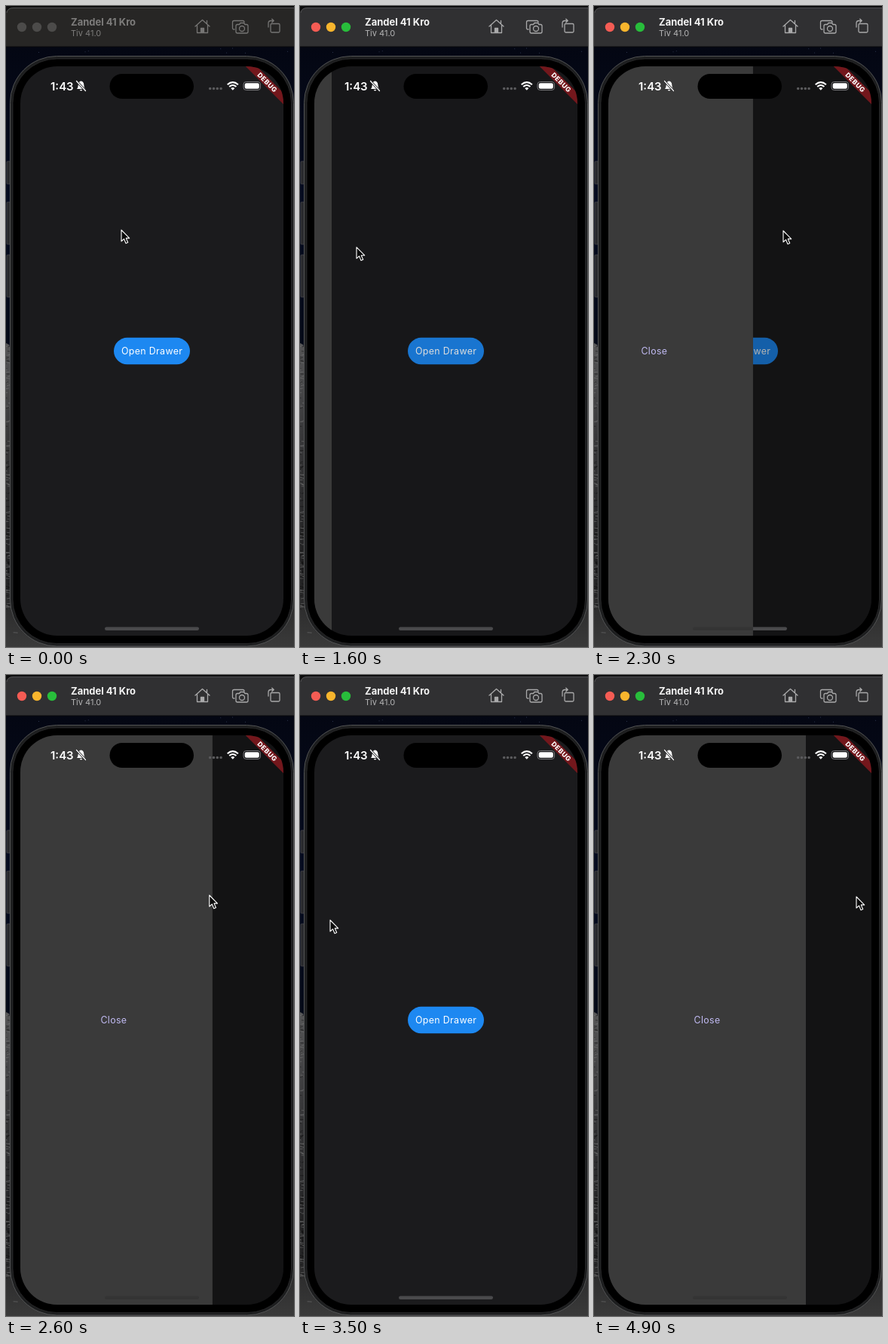
These frames come from a looping animation (382x850 px, 5000 ms). An HTML page:

```html
<!DOCTYPE html>
<html lang="en">
<head>
<meta charset="utf-8">
<title>Drawer demo</title>
<style>
  html, body { margin: 0; width: 100%; height: 100%; overflow: hidden; background: #050816; }
  svg { display: block; width: 382px; height: 850px; font-family: Inter, Roboto, sans-serif; }
  .label { font-size: 12.4px; letter-spacing: .35px; text-anchor: middle; }
  #bar { --bg: #303032; --title: #f4f4f4; --sub: #b4b4b5; --icon: #a9a9aa; --red: #f45c54; --amber: #f8b52d; --green: #28bd3b; }
  #bar.idle { --bg: #272625; --title: #7d7c7b; --sub: #7d7c7b; --icon: #767574; --red: #4c4b4a; --amber: #4c4b4a; --green: #4c4b4a; }
  #icons { fill: none; stroke: var(--icon); stroke-width: 1.3; stroke-linejoin: round; stroke-linecap: round; }
</style>
</head>
<body>
<svg viewBox="0 0 382 850">
  <defs>
    <linearGradient id="sky" x2="0" y2="1">
      <stop offset="0" stop-color="#03050f"/>
      <stop offset=".3" stop-color="#060c20"/>
      <stop offset=".52" stop-color="#050a18"/>
    </linearGradient>
    <linearGradient id="rock" x2="0" y2="1">
      <stop offset="0" stop-color="#555556"/>
      <stop offset=".3" stop-color="#38383a"/>
      <stop offset=".75" stop-color="#202021"/>
      <stop offset="1" stop-color="#3a3a3a"/>
    </linearGradient>
    <clipPath id="screen"><rect x="19" y="80" width="349" height="755" rx="49"/></clipPath>
  </defs>

  <rect width="382" height="850" fill="url(#sky)"/>
  <path d="M0 447L4 449L8 462H382V850H0Z" fill="url(#rock)"/>
  <g id="specks"></g>

  <g id="bar">
    <rect width="382" height="12" fill="#0c0c0d"/>
    <path d="M0 54V10Q1 2 10 2H382V54Z" fill="var(--bg)"/>
    <path d="M1 9Q2 2.5 10 2.5H382" fill="none" stroke="#505052"/>
    <path d="M0 54H382" stroke="#09090b"/>
    <circle cx="21" cy="28" r="6.2" fill="var(--red)"/>
    <circle cx="41" cy="28" r="6.2" fill="var(--amber)"/>
    <circle cx="61" cy="28" r="6.2" fill="var(--green)"/>
    <text x="86" y="26" font-size="13" font-weight="700" fill="var(--title)">Zandel 41 Kro</text>
    <text x="86" y="40" font-size="11" fill="var(--sub)">Tiv 41.0</text>
    <g id="icons">
      <path d="M251 27L260.5 18.5L270 27M253.5 25.5V35.5H267.5V25.5M266.5 23V19.5"/>
      <path d="M258.5 35V29.5H262.5V35" fill="var(--icon)"/>
      <path d="M303 31H302Q300.5 31 300.5 29.5V21.5Q300.5 19.5 302.5 19.5H314Q316 19.5 316 21.5"/>
      <path d="M307 24.5H309.5L311 22.5H315.5L317 24.5H319Q321 24.5 321 26.5V34Q321 36 319 36H307Q305 36 305 34V26.5Q305 24.5 307 24.5Z"/>
      <circle cx="313" cy="30" r="3.5"/>
      <rect x="351" y="23.5" width="12" height="11.5" rx="1.5"/>
      <path d="M348 28V23Q348 19.5 351.5 19.5H355M352.8 17.2L355.2 19.5L352.8 21.8"/>
    </g>
  </g>

  <g fill="#292a2d" stroke="#45464a" stroke-width=".8">
    <rect x="1" y="206" width="5" height="30" rx="1"/>
    <rect x="1" y="260" width="5" height="56" rx="1"/>
    <rect x="1" y="330" width="5" height="56" rx="1"/>
  </g>
  <rect x="5.5" y="66.5" width="376" height="782.5" rx="62" fill="#1d1e1f" stroke="#525354"/>
  <rect x="9" y="70" width="369.5" height="775.5" rx="58.5" stroke="#2c2d2e" stroke-width=".8"/>

  <g clip-path="url(#screen)">
    <rect x="19" y="80" width="349" height="755" fill="#1b1b1d"/>
    <rect x="143" y="439.8" width="101" height="35.5" rx="17.7" fill="#1d88f1"/>
    <text class="label" x="193.6" y="462" fill="#fff">Open Drawer</text>
    <rect id="scrim" x="19" y="80" width="349" height="755"/>
    <rect x="131" y="823.5" width="125" height="4.5" rx="2.2" fill="#4a4a4c"/>
    <rect id="drawer" x="19" y="80" height="755" fill="#3a3a3a"/>
    <rect id="dimBar" x="131" y="823.5" height="4.5" rx="2.2" fill="#343434"/>
    <text id="close" class="label" y="462" fill="#c0baf2">Close</text>
    <g transform="translate(368 80) rotate(45)">
      <rect x="-36" y="24.9" width="72" height="10.6" fill="#73171c"/>
      <text y="33.4" font-size="8.8" font-weight="800" letter-spacing=".5" text-anchor="middle" fill="#fff">DEBUG</text>
    </g>
  </g>

  <rect x="137.5" y="90" width="111.5" height="33" rx="16.5"/>
  <g fill="#fff">
    <text x="59" y="111.5" font-size="15" font-weight="600">1:43</text>
    <path d="M94 110Q95.8 108.3 95.8 104.5Q96 100.3 99.5 99.5Q103.2 100.3 103.3 104.5Q103.4 108.3 105.2 110ZM97.8 111H101.4Q99.6 114 97.8 111Z"/>
    <path d="M93.5 99.5L105.5 112.5" stroke="#29292b" stroke-width="3"/>
    <path d="M93.5 99.5L105.5 112.5" stroke="#fff" stroke-width="1.2" stroke-linecap="round"/>
    <path d="M270.7 109.5H286" stroke="#5b5b5d" stroke-width="3.6" stroke-linecap="round" stroke-dasharray="0 4.8"/>
    <path d="M293.7 104.3Q300.8 98 307.9 104.3M296.2 107Q300.8 103 305.4 107" fill="none" stroke="#fff" stroke-width="2.1"/>
    <path d="M298.2 109Q300.8 106.9 303.4 109L300.8 111.8Z"/>
    <rect x="315" y="100.5" width="22.5" height="11" rx="3.5" fill="none" stroke="#77777a"/>
    <rect x="316.7" y="102.2" width="19.1" height="7.6" rx="2.2"/>
  </g>

  <path id="cursor" d="M0 0V15L3.5 11.8L6 17.7L8.7 16.5L6.2 10.9H10.7Z" fill="#0a0a0a" stroke="#fff" stroke-width="1.1" stroke-linejoin="round"/>
</svg>
<script>
  const LOOP = 5000, STEP = 100, ACTIVE_AT = 1100;
  const SHUT = 19, OPEN = 281;
  const $ = id => document.getElementById(id);
  const set = (id, name, value) => $(id).setAttribute(name, value);
  const mix = (a, b, p) => a + (b - a) * p;
  const progress = (t, from, to) => Math.max(0, Math.min(1, (t - from) / (to - from)));
  const easeIn = p => p * p;
  const easeOut = p => 1 - (1 - p) ** 2;

  // Pointer moves in order, each starting where the last one ended.
  const moves = [
    { from: 300, to: 1000, x: 27, y: 325 },
    { from: 1400, to: 1900, x: 147, y: 312 },
    { from: 1900, to: 2300, x: 251, y: 298 },
    { from: 2300, to: 2700, x: 276, y: 290 },
    { from: 2800, to: 3000, x: 296, y: 290 },
    { from: 3200, to: 3500, x: 40, y: 325 },
    { from: 3500, to: 3700, x: 341, y: 309 },
    { from: 4600, to: 4900, x: 348, y: 294 }
  ];

  function pointerAt(t) {
    let x = 153, y = 297;
    for (const move of moves) {
      const p = progress(t, move.from, move.to);
      x = mix(x, move.x, p);
      y = mix(y, move.y, p);
    }
    return { x, y };
  }

  // Right edge of the drawer: dragged, released, shut, opened again.
  function edgeAt(t) {
    const dragged = Math.max(SHUT, 0.96 * pointerAt(Math.min(t, 2400)).x - 30);
    if (t < 1500) return SHUT;
    if (t < 3100) return mix(dragged, OPEN, easeOut(progress(t, 2400, 2700)));
    if (t < 3600) return mix(OPEN, SHUT, easeIn(progress(t, 3100, 3450)));
    return mix(SHUT, OPEN, easeOut(progress(t, 3600, 4000)));
  }

  function addSpecks() {
    let seed = 7;
    const random = () => (seed = seed * 16807 % 2147483647) / 2147483647;
    let specks = "";
    for (let i = 0; i < 160; i++) {
      const y = 452 + random() * 395;
      const x = y > 800 ? random() * 382 : random() * 6 - 3;
      specks += `<path d="M${x} ${y}l${3 + random() * 4} ${random() * 4 - 2}" stroke="${i % 2 ? "#808080" : "#0c0c0d"}" stroke-opacity=".5"/>`;
    }
    for (let i = 0; i < 8; i++) {
      specks += `<circle cx="${random() * 380}" cy="${56 + random() * 9}" r=".5" fill="#39435f"/>`;
    }
    $("specks").innerHTML = specks;
  }

  function draw(now) {
    const t = Math.floor(now % LOOP / STEP) * STEP;
    const pointer = pointerAt(t), edge = edgeAt(t), open = edge - SHUT;
    $("bar").classList.toggle("idle", t < ACTIVE_AT);
    set("scrim", "opacity", 0.3 * Math.min(1, open / 50));
    set("drawer", "width", open);
    set("dimBar", "width", Math.max(0, Math.min(125, edge - 131)));
    set("close", "x", edge - 131);
    set("cursor", "transform", `translate(${pointer.x} ${pointer.y})`);
  }

  addSpecks();
  const start = performance.now();
  function tick() {
    draw(performance.now() - start);
    requestAnimationFrame(tick);
  }
  tick();
</script>
</body>
</html>
```
